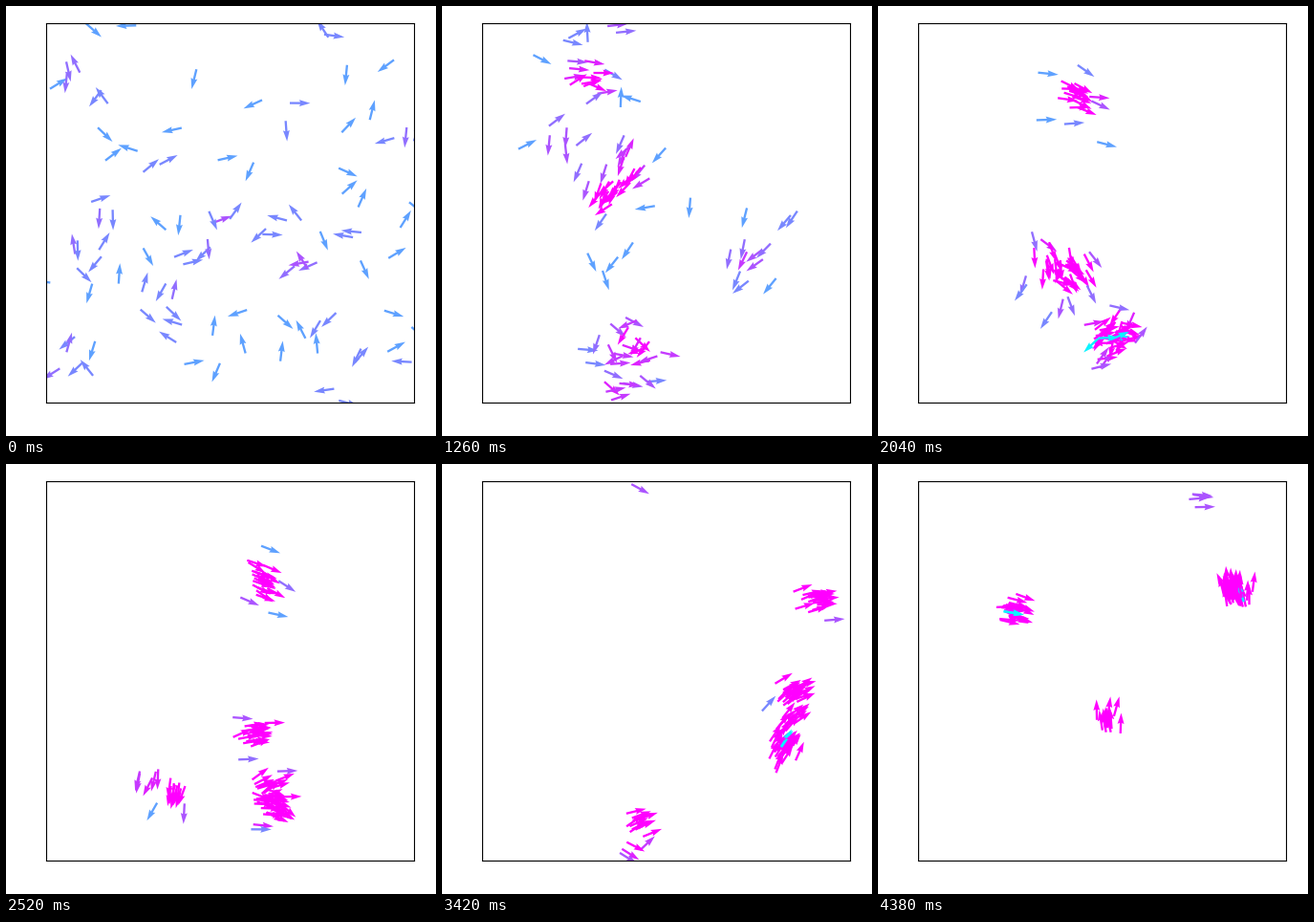
A matplotlib script for the animation above (4440 ms loop, 450 px wide and 450 px high).

```python
import numpy as np
import matplotlib.pyplot as plt
from matplotlib.animation import FuncAnimation

STAGE = 450
LEFT, TOP, RIGHT, BOTTOM = 42, 18, 427, 415
ORIGIN = np.array([LEFT, TOP])
BOX = np.array([RIGHT - LEFT, BOTTOM - TOP])
SPEED, SIGHT, TOUCH = 8.8, 20, 0.5
FRAMES, INTERVAL = 74, 60

# Size of each flock and the way points of its centre, beyond the box
# where it wraps around.
STEPS = np.array([11, 21, 34, 50, 65, 73])
ROUTES = [
    (22, [(110, 90), (150, 75), (203, 90), (332, 142), (451, 137), (519, 150)]),
    (20, [(250, 140), (185, 170), (198, 272), (312, 265), (395, 200), (375, 138)]),
    (12, [(235, 110), (172, 178), (185, 265), (172, 384), (240, 344), (242, 272)]),
    (13, [(355, 180), (332, 245), (248, 335), (316, 308), (393, 212), (370, 138)]),
    (19, [(140, 350), (190, 385), (245, 350), (312, 355), (388, 225), (380, 145)]),
    (10, [(285, 335), (205, 362), (240, 345), (310, 348), (390, 215), (374, 142)]),
    (4, [(190, 170), (182, 250), (165, 275), (150, 367), (256, 424), (330, 430)]),
]
FLOCK = np.repeat(np.arange(len(ROUTES)), [size for size, _ in ROUTES])
BIRDS = len(FLOCK)

rng = np.random.default_rng(12)
spread = rng.uniform(-0.5, 0.5, (BIRDS, 2)) * BOX
gather_time = 0.1 + 0.2 * rng.random(BIRDS) ** 5   # a few lag behind
first_turn = rng.uniform(0, 2 * np.pi, BIRDS)
sway_phase = rng.uniform(0, 2 * np.pi, BIRDS)
sway_size = rng.uniform(2, 10, BIRDS)

knots = np.concatenate([[0], STEPS])
points = np.array([way[:1] + way for _, way in ROUTES], float)
slopes = np.gradient(points, knots, axis=1)


def nearest_image(delta):
    """Shortest displacement in the periodic box."""
    return delta - BOX * np.round(delta / BOX)


def polar(size, angle):
    return (size * np.array([np.cos(angle), np.sin(angle)])).T


def centres(step):
    """Flock centres on a smooth curve through their way points."""
    k = min(np.searchsorted(knots, step, side="right"), len(knots) - 1) - 1
    length = knots[k + 1] - knots[k]
    t = (step - knots[k]) / length
    return ((2*t**3 - 3*t**2 + 1) * points[:, k]
            + (t**3 - 2*t**2 + t) * length * slopes[:, k]
            + (3*t**2 - 2*t**3) * points[:, k + 1]
            + (t**3 - t**2) * length * slopes[:, k + 1])


def place(step):
    """Scattered birds fly off at random, then draw in on their flock."""
    gather = 1 / (1 + (step / (FRAMES - 1) / gather_time) ** 2)
    dash = polar(SPEED * step * np.exp(-step / 8), first_turn)
    sway = polar(sway_size, sway_phase + 0.25 * step)
    return centres(step)[FLOCK] + gather[:, None] * spread + dash + sway


def flight(step):
    """Position in the box and unit heading of every bird."""
    pos = place(step)
    move = place(step + 0.1) - pos
    move /= np.hypot(*move.T)[:, None]
    return ORIGIN + (pos - ORIGIN) % BOX, move


def shade(pos):
    """Blue alone, magenta in a crowd, cyan when touching."""
    dist = np.hypot(*nearest_image(pos[:, None] - pos[None]).T)
    np.fill_diagonal(dist, np.inf)
    crowd = np.minimum(0.37 + 0.1 * (dist < SIGHT).sum(axis=0), 1)
    return np.where(dist.min(axis=0) < TOUCH, 0.05, crowd)


fig = plt.figure(figsize=(4.5, 4.5), dpi=100)
ax = fig.add_axes([LEFT / STAGE, 1 - BOTTOM / STAGE, *(BOX / STAGE)])
ax.set(xlim=(LEFT, RIGHT), ylim=(BOTTOM, TOP), xticks=[], yticks=[])

pos, move = flight(0)
arrows = ax.quiver(*pos.T, move[:, 0], -move[:, 1], shade(pos), cmap="cool",
                   clim=(0, 1), scale=18, scale_units="width",
                   units="width", width=0.006)


def draw(step):
    pos, move = flight(step)
    arrows.set_offsets(pos)
    arrows.set_UVC(move[:, 0], -move[:, 1], shade(pos))
    return arrows,


anim = FuncAnimation(fig, draw, frames=FRAMES, interval=INTERVAL,
                     repeat=True, repeat_delay=0)
plt.show()
```
